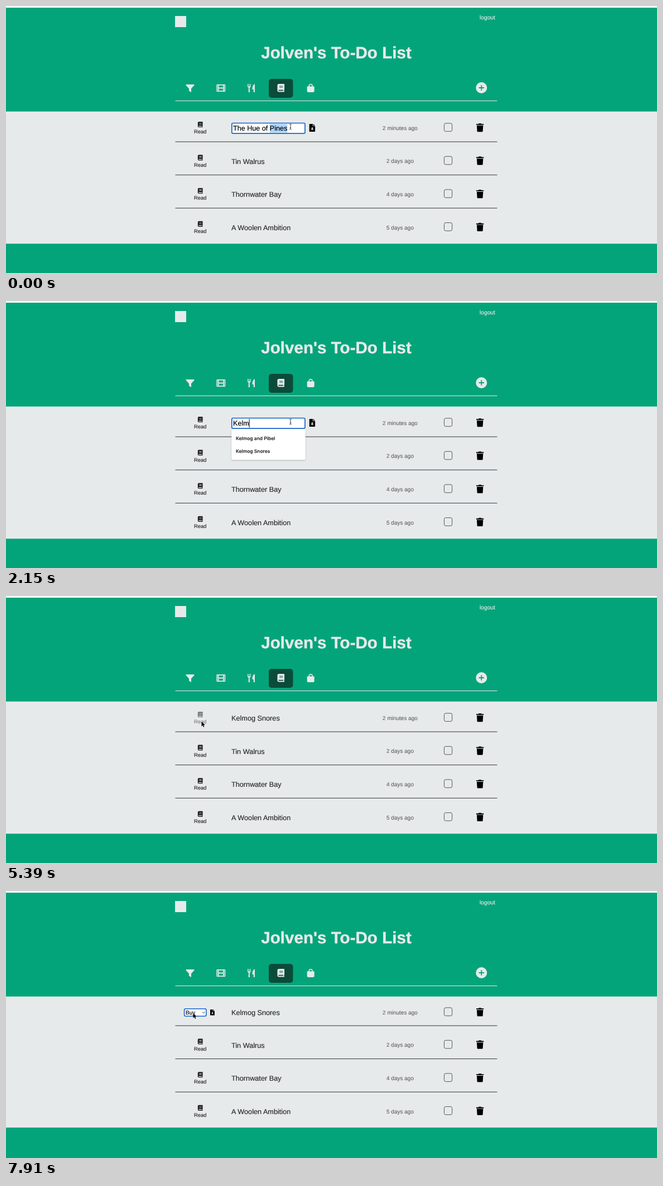
An HTML page that plays this animation: 1167x480 px, repeating every 8000 ms.

```html
<!DOCTYPE html>
<html lang="en">
<head>
<meta charset="utf-8">
<title>To-Do List</title>
<style>
  html, body { margin: 0; width: 100%; height: 100%; overflow: hidden; background: #fff; }
  svg { display: block; width: 100vw; height: 100vh; }
  text { font-family: "Liberation Sans", Arial, sans-serif; text-rendering: geometricPrecision; }
  .menu text { font-family: Inter, sans-serif; }
</style>
</head>
<body>
<svg id="stage" viewBox="0 0 1167 480"></svg>
<script>
const LOOP = 8000, ROW = 59.6;
const GREEN = '#04a47a', GREY = '#e7eaeb', BLUE = '#1263cb';
const OLD = 'The Hue of Pines', NEW = 'Kelmog Snores';
const HISTORY = [OLD, 'The Loud Orchard', 'The Tin Harbor', 'Tall Grass Road', 'Teapot Season',
  'Two Left Mittens', 'Kelmog and Pibel', NEW, 'Kiln Garden'];
const ROWS = [['', '2 minutes ago'], ['Tin Walrus', '2 days ago'],
  ['Thornwater Bay', '4 days ago'], ['A Woolen Ambition', '5 days ago']];

// Moments of the story
const SAVED = 4010, EDIT = 5480, OPEN = 6120, PICK = 7010;

const ICON = {
  book: 'M3 0H13q1 0 1 1V11q0 .7-.6 .9v2q.6.2.6 1T13.2 16H3Q0 16 0 13V3Q0 0 3 0ZM4 4.2v1h7v-1ZM4 6.6v1h7v-1ZM3 12q-1 0-1 1t1 1h8.6v-2Z',
  trash: 'M0 1H4L5 0H9L10 1H14V3H0ZM1 4H13L12.3 15q-.1 1-1 1H2.7q-1 0-1-1Z',
  save: 'M1 0H7V4.5H12V15q0 1-1 1H1q-1 0-1-1V1q0-1 1-1ZM8 0L12 3.6H8ZM5 7V10H3L6 13 9 10H7V7Z',
  filter: 'M1 0H15q1 .6.4 1.4L10 7.5V14L6 11.5V7.5L.6 1.4Q0 .6 1 0Z',
  film: 'M1 0H15L16 1V12L15 13H1L0 12V1ZM4.3 1.7V5.6H11.7V1.7ZM4.3 7.4V11.3H11.7V7.4Z' +
    [0, 1, 2, 3, 4, 5].map(i => `M${i % 2 ? 13.1 : 1.2} ${1.9 + 3.7 * (i >> 1)}h1.7v1.8h-1.7Z`).join(''),
  fork: 'M0 0V4.5q0 2 1.9 2.3L1.7 15H4L3.7 6.8Q5.8 6.5 5.8 4.5V0H4.7V4.5H3.4V0H2.4V4.5H1.1V0ZM13 0V15H10.8V10H8.6Q8 3 13 0Z',
  bag: 'M0 4.6H2.8V3.7A3.7 3.7 0 0 1 10.2 3.7V4.6H13V12.5Q13 15 10.5 15H2.5Q0 15 0 12.5ZM4.3 4.6H8.7V3.7A2.2 2.2 0 0 0 4.3 3.7Z',
  arrow: 'M0 0V9L2.1 7.1 3.5 10.3 5 9.6 3.6 6.6H6.4Z'
};

const stage = document.getElementById('stage');
const pen = document.createElement('canvas').getContext('2d');
pen.font = '12.6px "Liberation Sans", Arial, sans-serif';
const widthOf = s => pen.measureText(s).width;

const ramp = (t, from, to) => Math.min(1, Math.max(0, (t - from) / (to - from)));
const ease = u => u * u * (3 - 2 * u);

// Value on a line through [time, value] points
const along = (points, t) => points.reduce((v, [time, goal], i) =>
  i ? v + (goal - points[i - 1][1]) * ramp(t, points[i - 1][0], time) : goal, 0);

const rect = (x, y, w, h, fill, more = '') =>
  `<rect x="${x}" y="${y}" width="${w}" height="${h}" fill="${fill}" ${more}/>`;
const text = (s, x, y, size, fill, more = '') =>
  `<text x="${x}" y="${y}" font-size="${size}" fill="${fill}" stroke="${fill}" stroke-width="${size / 70}" ${more}>${s}</text>`;
const icon = (name, x, y, scale, fill, more = '') =>
  `<path d="${ICON[name]}" transform="translate(${x} ${y}) scale(${scale})" fill="${fill}" fill-rule="evenodd" ${more}/>`;
const MIDDLE = 'text-anchor="middle"';

function header() {
  return rect(0, 3, 1167, 477, GREEN) +
    rect(303, 18, 20, 20, GREY) +
    text('logout', 863, 23.5, 10.2, GREY, MIDDLE) +
    text("Jolven's To-Do List", 592, 94, 29.6, GREY, MIDDLE + ' font-weight="700"') +
    icon('filter', 322, 141, 1, GREY) +
    icon('film', 377.3, 141, 1, GREY) +
    icon('fork', 433, 140, 1, GREY) +
    rect(471, 131, 43.5, 34, '#0b4b3a', 'rx="5"') +
    icon('book', 486.5, 140, 0.9, GREY) +
    icon('bag', 539.7, 140, 1, GREY) +
    `<circle cx="852.3" cy="147" r="10" fill="${GREY}"/>` +
    `<path d="M847.6 147h9.4M852.3 142.3v9.4" stroke="${GREEN}" stroke-width="1.8"/>` +
    rect(303.5, 170, 577, 1, GREY);
}

function row(i, t) {
  const editing = t >= EDIT;
  const lift = editing ? 2 : 0;
  const [title, age] = ROWS[i];
  const fade = i ? 1 : 1 - 0.45 * ramp(t, 4950, 5120);
  const label = i || !editing
    ? `<g opacity="${fade}">` + icon('book', 343.8, 208, 0.63, '#222') +
      text('Read', 348.2, 229.3, 9.4, '#222', MIDDLE) + '</g>' : '';
  const name = i ? title : t >= SAVED ? NEW : '';
  const line = i < 3 ? rect(303.5, 243.6 + i * ROW - lift, 577, 1, '#333') : '';
  return `<g transform="translate(0 ${i * ROW - (i ? lift : lift / 2)})">` + label +
    text(name, 404, 224, 12.7, '#2a2a2a') +
    text(age, 706.5, 222.8, 10, '#666', MIDDLE) +
    rect(785.5, 210.8, 14.2, 14.6, 'none', 'rx="2.8" stroke="#555"') +
    icon('trash', 843, 211, 0.95, '#000') + '</g>' + line;
}

// Fast erasing, then typing with a short pause after the first word
function typedText(t) {
  if (t < 260) return OLD;
  if (t < 1790) return OLD.slice(0, Math.ceil(along([[260, 11], [380, 8], [560, 7], [920, 3], [1490, 0]], t)));
  return NEW.slice(0, Math.floor(along([[1790, 1], [1970, 2], [2330, 6], [2690, 8], [2900, 10], [3260, 13]], t) + 1e-6));
}

function titleInput(t) {
  const typed = typedText(t);
  const start = widthOf('The Hue of ');
  const mark = t < 260 ? rect(407 + start, 212, widthOf(OLD) - start, 15.5, '#b0d5fd') : '';
  const caret = t >= 260 && t < 3800 ? rect(407 + widthOf(typed), 212, 1, 15.5, '#000') : '';
  const hits = typed ? HISTORY.filter(s => s !== typed && s.startsWith(typed)) : [];
  const list = hits.length
    ? '<g class="menu">' + rect(404.3, 230, 132.6, 10.5 + 22.5 * hits.length, '#fff', 'rx="2.5" filter="url(#shade)"') +
      hits.map((s, i) => text(s, 412, 250 + 22.5 * i, 8.5, '#111', 'font-weight="500"')).join('') + '</g>' : '';
  return rect(404.8, 210.5, 131.2, 18.6, '#fff', `rx="2.2" stroke="${BLUE}" stroke-width="1.7"`) +
    mark + text(typed.trim(), 407, 224, 12.6, '#000') + caret +
    icon('save', 543.7, 212, 0.87, t >= 3530 ? '#0a9f76' : '#000') + list;
}

function kindSelect(t) {
  return rect(319.6, 211.8, 39.4, 13.2, '#fff', `rx="2.5" stroke="${BLUE}" stroke-width="1.6"`) +
    text(t < PICK + 90 ? 'Read' : 'Buy', 322, 221.8, 10, '#000') +
    '<path d="M352 217.3l2.3 2.3 2.3-2.3" fill="none" stroke="#222"/>' +
    icon('save', 366, 213, 0.66, '#000');
}

function kindMenu(t) {
  const opacity = 1 - ramp(t, PICK + 180, PICK + 500);
  if (t < OPEN || !opacity) return '';
  const blink = t >= PICK && t < PICK + 90;
  const chosen = blink ? -1 : pointerAt(t)[1] < 227 ? 2 : 3;
  const items = ['Watch', 'Eat', 'Read', 'Buy'].map((s, i) => {
    const y = 186.6 + 16.3 * i, ink = i === chosen ? '#fff' : '#1c1c1c';
    return (i === chosen ? rect(317, y - 8, 48.6, 16.2, '#4596fb', 'rx="3"') : '') +
      (i === 2 ? `<path d="M320.8 ${y + 0.8}l1.8 2.3 3.2-5.4" fill="none" stroke="${ink}" stroke-width="1.1"/>` : '') +
      text(s, 329.3, y + 3.5, 9.8, ink);
  }).join('');
  return `<g class="menu" opacity="${opacity}">` +
    rect(314.2, 176, 54.4, 71, 'url(#glass)', 'rx="5" filter="url(#shade)"') + items + '</g>';
}

// Each move: start, end, goal x, goal y
const MOVES = [[3400, 3620, 547.5, 227], [4370, 5120, 350.5, 225.5], [5560, 5890, 337, 216.5],
  [6210, 6560, 338, 233], [7510, 7910, 335.5, 219.5]];

function pointerAt(t) {
  return MOVES.reduce(([x, y], [from, to, gx, gy]) => {
    const u = ease(ramp(t, from, to));
    return [x + (gx - x) * u, y + (gy - y) * u];
  }, [510, 217]);
}

function pointer(t) {
  const place = pointerAt(t);
  if (t >= 3530) return icon('arrow', ...place, 1, '#000', 'stroke="#fff" stroke-width=".8" paint-order="stroke"');
  return `<path transform="translate(${place})" fill="none" stroke="#333" stroke-width=".9"
    d="M-2-4.7q2 0 2 1.5V3.2q0 1.5-2 1.5M2-4.7q-2 0-2 1.5M0 3.2q0 1.5 2 1.5M-1.2 1.5h2.4"/>`;
}

const DEFS = `<defs>
  <filter id="shade" x="-10%" y="-10%" width="120%" height="130%">
    <feDropShadow dx="0" dy="1" stdDeviation="1.2" flood-opacity=".28"/></filter>
  <linearGradient id="glass" x2="0" y2="1"><stop stop-color="#c9e1d8"/>
    <stop offset=".4" stop-color="#e1e8e7"/><stop offset="1" stop-color="#e6eaea"/></linearGradient></defs>`;
const HEADER = header();

function scene(t) {
  return DEFS + HEADER + rect(0, 189.7, 1167, t < EDIT ? 237.6 : 235.6, GREY) +
    ROWS.map((_, i) => row(i, t)).join('') +
    (t < SAVED ? titleInput(t) : '') +
    (t >= EDIT ? kindSelect(t) : '') +
    kindMenu(t) + pointer(t);
}

let shown = '';
const begin = performance.now();
function tick() {
  const next = scene((performance.now() - begin) % LOOP);
  if (next !== shown) stage.innerHTML = shown = next;
  requestAnimationFrame(tick);
}
tick();
</script>
</body>
</html>
```
